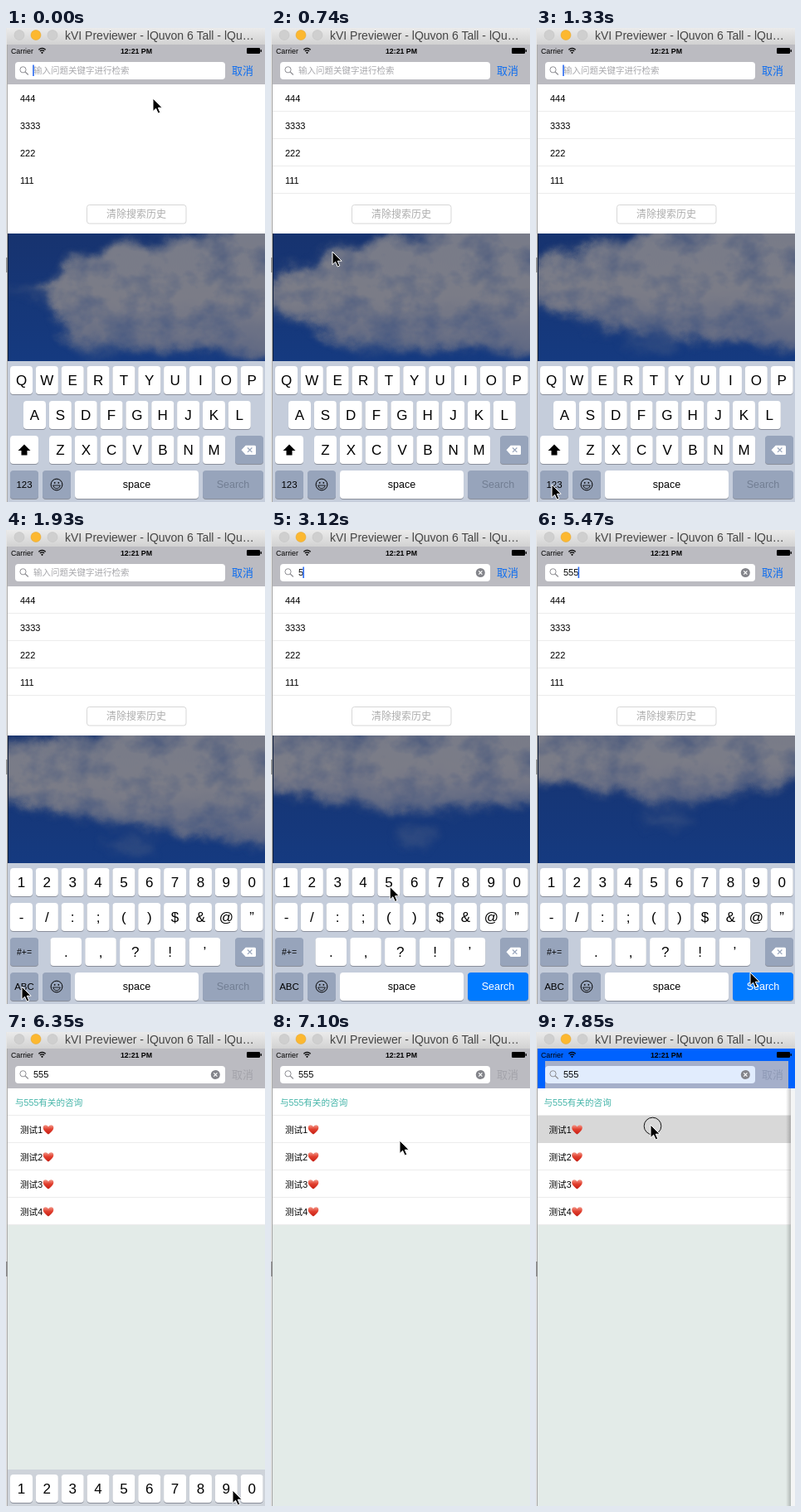
Recreate the animation shown at these times as an HTML page. Size 312 by 572 pixels, loop 8 s.

```html
<!DOCTYPE html>
<html lang="zh-CN">
<head>
<meta charset="utf-8">
<title>Search history</title>
<style>
html, body { margin: 0; width: 100%; height: 100%; overflow: hidden; background: #fff; }
svg { display: block; width: 312px; height: 572px; }
text { font-family: "Liberation Sans", "Noto Sans CJK SC", "Noto Sans CJK", sans-serif; white-space: pre; }
</style>
</head>
<body>
<svg viewBox="0 0 312 572">
  <defs>
    <linearGradient id="titleBar" x2="0" y2="1">
      <stop stop-color="#ebebeb"/><stop offset="1" stop-color="#d2d2d2"/>
    </linearGradient>
    <linearGradient id="blueSky" x2="0" y2="1">
      <stop stop-color="#17336f"/><stop offset="1" stop-color="#153a80"/>
    </linearGradient>
    <linearGradient id="vapour" x2="0" y2="1">
      <stop stop-color="#777b89"/><stop offset=".6" stop-color="#7b7c87"/><stop offset="1" stop-color="#5c6683"/>
    </linearGradient>
    <linearGradient id="heart" x2="0" y2="1">
      <stop stop-color="#f39a8c"/><stop offset=".45" stop-color="#e2402f"/><stop offset="1" stop-color="#c41e14"/>
    </linearGradient>
    <linearGradient id="edgeShade">
      <stop stop-color="#000" stop-opacity="0"/><stop offset="1" stop-color="#000" stop-opacity=".22"/>
    </linearGradient>
    <filter id="fluff" filterUnits="userSpaceOnUse" x="-40" y="190" width="400" height="240" color-interpolation-filters="sRGB">
      <feTurbulence type="fractalNoise" baseFrequency=".025 .03" numOctaves="4" seed="8" result="noise"/>
      <feColorMatrix in="noise" values="0 0 0 0 0  0 0 0 0 0  0 0 0 0 0  .8 0 0 0 .52" result="mottle"/>
      <feGaussianBlur in="SourceGraphic" stdDeviation="6" result="soft"/>
      <feDisplacementMap in="soft" in2="noise" scale="26" xChannelSelector="R" yChannelSelector="G" result="torn"/>
      <feComposite in="torn" in2="mottle" operator="in"/>
    </filter>
    <clipPath id="skyClip"><rect x="2" y="248" width="310" height="155"/></clipPath>
  </defs>
  <g id="scene"></g>
</svg>
<script>
const LOOP = 8000, STEP = 148, LAST = 53;
const RESULTS = 41, PUSH = 53;
const TYPED = [21, 27, 30];

// step, then values to interpolate
const POINTER = [
  [0, 177, 85], [1, 174, 92], [5, 74, 270], [8, 24, 517], [9, 19, 551], [16, 19, 551],
  [20, 141, 428], [24, 150, 438], [29, 153, 440], [33, 153, 440], [37, 258, 534],
  [39, 264, 548], [43, 273, 553], [48, 155, 131], [49, 138, 112]
];
const CLOUD_TOP = [
  [0, 318, 318, 272, 258, 255, 238, 232],
  [5, 330, 288, 260, 248, 238, 230, 230],
  [13, 262, 256, 240, 232, 225, 225, 225],
  [29, 225, 225, 225, 225, 225, 225, 225]
];
const CLOUD_BASE = [
  [0, 318, 320, 380, 385, 387, 396, 400],
  [5, 332, 352, 379, 384, 386, 391, 394],
  [13, 325, 335, 349, 356, 366, 377, 376],
  [29, 310, 308, 315, 320, 305, 288, 282],
  [37, 308, 305, 318, 328, 325, 310, 285]
];
const WISP = [[0, 120, 386], [13, 150, 380], [29, 198, 355], [37, 155, 349]];
const KEYBOARD_DROP = [[41, 0], [42, 50], [43, 126], [44, 170]];

function sample(table, step) {
  const next = table.findIndex(row => row[0] >= step);
  if (next < 0) return table[table.length - 1].slice(1);
  const b = table[next], a = table[Math.max(0, next - 1)];
  const k = b === a ? 0 : (step - a[0]) / (b[0] - a[0]);
  return a.slice(1).map((v, i) => v + (b[i + 1] - v) * k);
}

const rect = (x, y, w, h, fill, extra = '') =>
  `<rect x="${x}" y="${y}" width="${w}" height="${h}" fill="${fill}" ${extra}/>`;
const circle = (x, y, r, fill, extra = '') =>
  `<circle cx="${x}" cy="${y}" r="${r}" fill="${fill}" ${extra}/>`;
const path = (d, fill, extra = '') => `<path d="${d}" fill="${fill}" ${extra}/>`;
const line = (d, color, width, extra = '') =>
  path(d, 'none', `stroke="${color}" stroke-width="${width}" ${extra}`);
const text = (x, y, value, size, fill = '#000', extra = '') =>
  `<text x="${x}" y="${y}" font-size="${size}" fill="${fill}" ${extra}>${value}</text>`;
const group = (x, y, body) => `<g transform="translate(${x} ${y})">${body}</g>`;
const MIDDLE = 'text-anchor="middle"';

function windowFrame() {
  const lights = [['#cfcfcf', 16], ['#fcb830', 36], ['#cfcfcf', 56]]
    .map(([fill, x]) => circle(x, 8.5, 6, fill, `stroke="${x === 36 ? '#dfa02a' : '#bebebe'}" stroke-width=".5"`)).join('');
  return rect(0, 0, 2, 572, '#e6e6e6') + rect(1, 20, 1, 552, '#a9a9a9') + rect(0, 277, 2, 18, '#8f8f8f') +
    rect(1, 0, 311, 20, 'url(#titleBar)') + lights +
    text(71, 14, 'kVI Previewer - lQuvon 6 Tall - lQu…', 14, '#454545');
}

function statusBar() {
  const wifi = line('M39.3 26.2q4.2-3.6 8.4 0M40.9 28q2.6-2.2 5.2 0', '#000', 1.2) + circle(43.5, 29.8, 1.1, '#000');
  const battery = rect(290, 24, 16, 7, '#000', 'rx="1.2"') + rect(306.5, 26, 1.4, 3, '#000', 'rx=".6"');
  return text(6, 31, 'Carrier', 8.8) + wifi +
    text(157, 31, '12:21 PM', 8.8, '#000', `${MIDDLE} font-weight="bold"`) + battery;
}

function searchBar(step) {
  const count = TYPED.filter(s => s <= step).length;
  const pushed = step >= PUSH;
  const typedAt = count ? TYPED[count - 1] : 0;
  const caretOn = step < RESULTS && ((step - typedAt) * STEP) % 1000 < 500;
  let out = pushed
    ? rect(2, 20, 310, 48, '#0062fe') + rect(11, 35, 293, 33, '#a5afca')
    : rect(2, 20, 310, 48, '#bbbbc1');
  out += statusBar() + rect(11, 41, 253, 21, pushed ? '#e1ecfd' : '#fff', 'rx="4"') +
    circle(20.5, 50.3, 3.6, 'none', 'stroke="#8e8e93" stroke-width="1"') + line('M23.2 53l3.6 3.5', '#8e8e93', 1.2);
  if (count) {
    out += text(33, 55, '5'.repeat(count), 11) + circle(252.3, 51.5, 5.5, '#84858b') +
      line('M250.2 49.4l4.2 4.2m0-4.2l-4.2 4.2', '#fff', 1.2);
  } else {
    out += text(33, 55, '输入问题关键字进行检索', 10.5, '#a8a8ac');
  }
  if (caretOn) out += rect(32.2 + count * 6.12, 44.5, 1.6, 13.5, '#2869f0');
  return out + text(272, 55.5, '取消', 13, step >= RESULTS ? (pushed ? '#8e99b5' : '#a3a3aa') : '#0b6cf0');
}

function sky(step) {
  const xs = i => i * 62 - 30;
  const curve = pts => pts.slice(1).map(([x, y], i) => {
    const [px, py] = pts[i], mid = (px + x) / 2;
    return `C${mid} ${py} ${mid} ${y} ${x} ${y}`;
  }).join('');
  const top = sample(CLOUD_TOP, step).map((y, i) => [xs(i), y]);
  const base = sample(CLOUD_BASE, step).map((y, i) => [xs(i), y]).reverse();
  const [wx, wy] = sample(WISP, step);
  const shape = `M${top[0]}${curve(top)}L${base[0]}${curve(base)}Z`;
  return `<g clip-path="url(#skyClip)">${rect(2, 248, 310, 155, 'url(#blueSky)')}` +
    `<g filter="url(#fluff)">${path(shape, 'url(#vapour)')}` +
    `<ellipse cx="${wx}" cy="${wy}" rx="30" ry="10" fill="#6d7489" opacity=".3"/></g>` +
    `${rect(2, 248, 1, 155, '#10203f')}</g>`;
}

const separators = ys => ys.map(y => rect(2, y, 310, 1, '#ececec')).join('');

function history(step) {
  const rows = ['444', '3333', '222', '111'].map((s, i) => text(17, 88.5 + i * 33, s, 11)).join('');
  return rect(2, 68, 310, 180, '#fff') + (step ? separators([100, 133, 166, 199]) : '') + rows +
    rect(97.5, 213.5, 119.5, 22.5, '#fff', 'rx="3" stroke="#cdcdcd" stroke-width=".8"') +
    text(157, 229, '清除搜索历史', 12, '#acacac', MIDDLE) + sky(step);
}

function results(step) {
  const pushed = step >= PUSH, shift = pushed ? -1.5 : 0;
  const heart = path('M0 5.8C-3 3.2-6.3.6-6.3-2.4-6.3-6.3-1.6-6.8 0-3.2 1.6-6.8 6.3-6.3 6.3-2.4 6.3.6 3 3.2 0 5.8Z', 'url(#heart)');
  const rows = [1, 2, 3, 4].map(n => {
    const y = 88.5 + n * 33;
    return text(17, y, '测试' + n, 10.6) + group(51, y - 3.7, heart);
  }).join('');
  const page = text(11, 88.5, '与555有关的咨询', 10.6, '#45b5a9') + rows;
  let out = rect(2, 68, 310, 504, '#e3ebe8') + rect(2, 68, 310, 165, '#fff') +
    separators([100, 133, 166, 199, 232]);
  if (pushed) out += rect(2, 101, 305, 33, '#d8d8d8');
  out += group(shift, 0, page);
  if (pushed) out += rect(301, 68, 6, 504, 'url(#edgeShade)') + rect(307, 68, 5, 504, '#f4f5f5');
  return out;
}

function key(x, y, w, label, size = 17, fill = '#fff', color = '#000') {
  return rect(x, y + 1, w, 34, '#8a8f9b', 'rx="4"') + rect(x, y, w, 34, fill, 'rx="4"') +
    text(x + w / 2, y + 17 + size * .35, label, size, color, MIDDLE);
}
const keyRow = (labels, x, y, pitch = 30.85, width = 27) =>
  [...labels].map((c, i) => key(x + i * pitch, y, width, c === '&' ? '&amp;' : c)).join('');

function keyboard(step) {
  const DARK = '#97a4bb';
  const numeric = step >= 11, enabled = step >= TYPED[0];
  const smile = circle(61, 551, 6.9, 'none', 'stroke="#000" stroke-width="1"') +
    circle(58.7, 548.8, .9, '#000') + circle(63.3, 548.8, .9, '#000') +
    path('M56.6 552h8.8q-.9 3.8-4.4 3.8t-4.4-3.8z', 'none', 'stroke="#000" stroke-width=".8"');
  const erase = path('M283.5 509.3l5.2-5.6h10.8q1.5 0 1.5 1.5v8.2q0 1.5-1.5 1.5h-10.8z', '#fff') +
    line('M291 506.5l5.4 5.4m0-5.4l-5.4 5.4', DARK, 1.2);
  const rows = numeric
    ? keyRow('1234567890', 5, 408) + keyRow('-/:;()$&@”', 5, 450) +
      key(5, 492, 34, '#+=', 10.5, DARK) + keyRow('.,?!’', 53.5, 492, 41.8, 37.5)
    : keyRow('QWERTYUIOP', 5, 408) + keyRow('ASDFGHJKL', 21, 450) + key(5, 492, 34, '') +
      path('M22 502.5l7.5 7.6h-4v5.4h-7v-5.4h-4z', '#000') + keyRow('ZXCVBNM', 52, 492);
  const body = rect(2, 402, 310, 170, step >= RESULTS ? '#ced3da' : '#c5cddb') + rows +
    key(276, 492, 34, '', 12, DARK) + erase +
    key(5, 534, 34, numeric ? 'ABC' : '123', 11.5, DARK) + key(44, 534, 34, '', 12, DARK) + smile +
    key(83, 534, 149, 'space', 12.5) +
    key(237, 534, 73, 'Search', 12.5, enabled ? '#007aff' : DARK, enabled ? '#fff' : '#727e93');
  return group(0, sample(KEYBOARD_DROP, step)[0], body);
}

function pointer(step) {
  const [x, y] = sample(POINTER, step);
  const ring = step >= PUSH ? circle(140.5, 113.5, 10.3, 'none', 'stroke="#111" stroke-width="1"') : '';
  return ring + group(x, y, path('M0 0V15.6L3.6 12.2 6.2 18 8.8 16.9 6.3 11.2H11.2Z', '#000', 'stroke="#fff" stroke-width="1"'));
}

function draw(step) {
  return windowFrame() + (step < RESULTS ? history(step) : results(step)) + searchBar(step) +
    (step < 44 ? keyboard(step) : '') + pointer(step);
}

const scene = document.getElementById('scene');
const start = performance.now();
let shown = -1;
function tick() {
  const time = (performance.now() - start) % LOOP;
  const step = Math.min(LAST, Math.floor((time + 20) / STEP));
  if (step !== shown) scene.innerHTML = draw(shown = step);
  requestAnimationFrame(tick);
}
tick();
</script>
</body>
</html>
```
